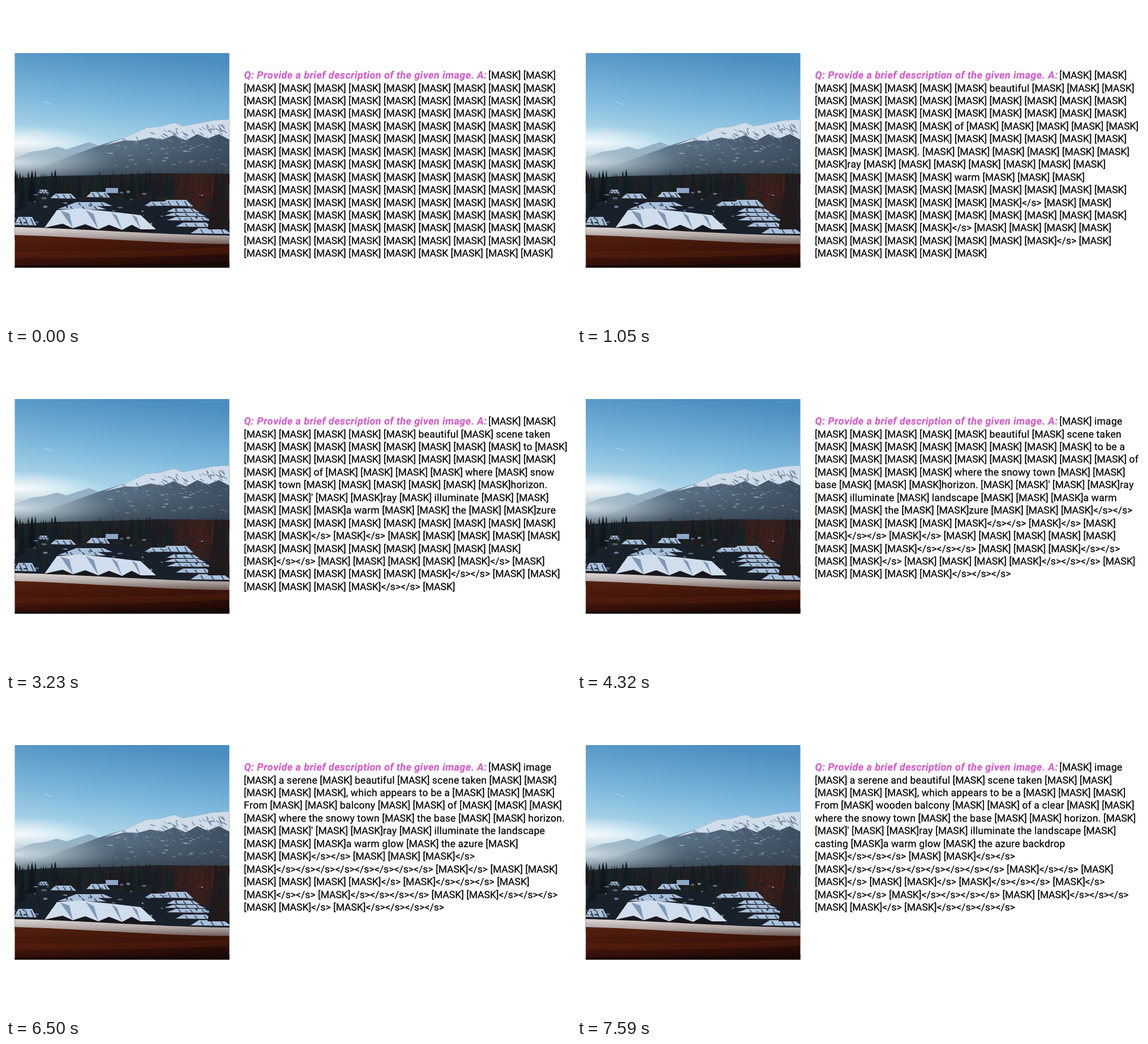
These frames come from a looping animation (998 px wide and 561 px high, 8 s). An HTML page:

```html
<!DOCTYPE html>
<html lang="en">
<head>
<meta charset="utf-8">
<title>Masked text decoding</title>
<style>
  html, body { margin: 0; width: 100%; height: 100%; overflow: hidden; background: #fff; }
  svg { display: block; }
  text { font: 17.5px Roboto, sans-serif; font-kerning: none; white-space: pre; text-rendering: geometricPrecision; }
  #answer { stroke: #000; stroke-width: .25px; }
  .word { letter-spacing: .27px; }
  .end { letter-spacing: .09px; }
  #question { font-size: 18px; font-weight: 700; font-style: italic; letter-spacing: .44px; fill: #d55fcb; stroke: #d55fcb; stroke-width: .2px; }
</style>
</head>
<body>
<svg width="998" height="561" viewBox="0 0 998 561">
  <defs>
    <clipPath id="photo"><rect x="15.5" y="83" width="379" height="378.5"/></clipPath>
    <linearGradient id="sky" x1=".6" y1="0" x2=".4" y2="1">
      <stop offset="0" stop-color="#4a8dc0"/><stop offset=".45" stop-color="#80badd"/>
      <stop offset=".75" stop-color="#b2d9eb"/><stop offset="1" stop-color="#dcecf1"/>
    </linearGradient>
    <radialGradient id="glow">
      <stop offset="0" stop-color="#fff" stop-opacity=".95"/><stop offset="1" stop-color="#fff" stop-opacity="0"/>
    </radialGradient>
    <radialGradient id="haze">
      <stop offset="0" stop-color="#dbe8ee" stop-opacity=".9"/><stop offset="1" stop-color="#a9bfcd" stop-opacity="0"/>
    </radialGradient>
    <linearGradient id="slope" x1="0" y1="0" x2="1" y2="0">
      <stop offset="0" stop-color="#8ca5b7"/><stop offset=".4" stop-color="#5c7285"/><stop offset="1" stop-color="#3d4e60"/>
    </linearGradient>
    <linearGradient id="foot" x1="0" y1="0" x2="0" y2="1">
      <stop offset="0" stop-color="#33424f" stop-opacity="0"/><stop offset="1" stop-color="#2c3843" stop-opacity=".8"/>
    </linearGradient>
    <linearGradient id="woods" x1="0" y1="0" x2="1" y2="0">
      <stop offset="0" stop-color="#1a242c"/><stop offset=".65" stop-color="#1f2024"/>
      <stop offset=".85" stop-color="#35201c"/><stop offset="1" stop-color="#241a1b"/>
    </linearGradient>
    <linearGradient id="rail" x1="0" y1="0" x2="0" y2="1">
      <stop offset="0" stop-color="#dcd8d7"/><stop offset=".5" stop-color="#b3a9a6"/><stop offset="1" stop-color="#6d5b57"/>
    </linearGradient>
    <linearGradient id="wood" x1="0" y1="0" x2=".5" y2="1">
      <stop offset="0" stop-color="#54210f"/><stop offset=".5" stop-color="#43160b"/><stop offset="1" stop-color="#220a07"/>
    </linearGradient>
  </defs>

  <g clip-path="url(#photo)">
    <rect x="15" y="83" width="380" height="220" fill="url(#sky)"/>
    <ellipse cx="20" cy="244" rx="150" ry="34" fill="url(#glow)"/>
    <path d="M68 169L82 174" stroke="#c5e0ee"/>
    <circle cx="53" cy="225" r="6" fill="#e6dfe6" opacity=".5"/>
    <path d="M15 268L45 257L68 254L90 248L107 253L128 246L147 240L165 247L215 240V310H15Z" fill="#94b0c4"/>
    <path d="M15 298L60 284L110 266L165 246L210 232L248 215L272 213L297 206L312 212L335 208L365 202L395 200V315H15Z" fill="url(#slope)"/>
    <path d="M172 246L210 232L248 215L272 213L297 206L312 212L335 208L365 202L395 200V236L376 226L356 234L338 226L318 237L296 228L276 236L255 232L232 238L210 237Z" fill="#cfdce9"/>
    <g id="rocks" stroke="#5f7893" stroke-width="1.6"></g>
    <g id="patches" fill="#c8d4dd"></g>
    <rect x="15" y="255" width="380" height="55" fill="url(#foot)"/>
    <ellipse cx="15" cy="276" rx="185" ry="36" fill="url(#haze)"/>
    <path d="M15 304L80 300L180 298L270 295L395 296V400H15Z" fill="url(#woods)"/>
    <g id="trees"></g>

    <path d="M15 365L45 350L78 345L185 340L250 345L395 375V412H15Z" fill="#18202a"/>
    <g id="roofs"></g>
    <g id="specks"></g>
    <path d="M76 386H262L258 404H72Z" fill="#17171c"/>
    <path d="M68 391L90 360L130 357L196 364L238 369L265 394L238 394L222 386L205 395L182 386L163 394L140 385L118 392L100 384Z" fill="#cfddec"/>
    <path d="M96 361L118 392L112 366ZM141 360L163 394L155 367ZM186 364L205 395L196 370ZM222 368L238 394L231 373Z" fill="#7f98b6"/>
    <path d="M372 292L356 394H392Z" fill="#201a1b"/>

    <path d="M15 402C130 404 270 416 395 419V462H15Z" fill="url(#wood)"/>
    <path d="M15 432C140 434 270 432 395 425V437C270 443 140 446 15 444Z" fill="#6b2a12" opacity=".3"/>
    <path d="M15 458C140 458 270 456 395 452V462H15Z" fill="#160908"/>
    <path d="M15 390C120 392 280 404 395 405V420C270 419 130 407 15 404Z" fill="url(#rail)"/>
  </g>

  <text id="question" x="420.5" y="128.2">Q: Provide a brief description of the given image. A:</text>
  <g id="answer"></g>
</svg>

<script>
const LOOP = 8000, FIRST = 1050, STEP = 1090;
const ROW_Y = 128.2, ROW_H = 22.43;

// "#" is a mask, "#5" five masks in a row, "~" an end token; rows are split by "|".
const states = [
  '#2' + '|#9'.repeat(13) + '|#5 [MASK #3',
  '#2|#5 beautiful #3|#9|#9|#4 of #5|#9|#3. #6|#ray #7|#4 warm #3|#9|#6~ #2|#9|#4~ #4|#7~ #|#5',
  "#2|#5 beautiful #2 taken|#9 to|#9|#3 of #6|#3 town #5|#2. # #' #2ray # illuminate|#5a warm #3|#2zure #6|#5~ #~ #2|#9|#3~ #5|#~ #6|#~~ #6~~|#",
  "#2|#5 beautiful # scene taken|#8 to #|#9|#2 of #4 where # snow|# town #6horizon.|# #' #2ray # illuminate #2|#3a warm #2 the #2zure|#9|#2~ #~ #5|#8|#~~ #5~ #|#6~~ #2|#4~~ #",
  "# image|#5 beautiful # scene taken|#8 to be a|#9 of|#4 where the snowy town #2|base #3horizon. # #' #2ray|# illuminate # landscape #3a warm|#2 the #2zure #3~~|#5~~ #~ #|#~~ #~ #5|#3~~~ #3~~|#2~ #4~~~ #|#4~~~",
  "# image|#2 serene # beautiful # scene taken #|#4, which appears to be a #2|# From #2 balcony #2 of #2|#2 where the snowy town #2 base #|# horizon. # #' #2ray # illuminate|the landscape #3a warm glow # the #|#zure #3~~ #3|#2~~~~~~~~ #~ #|#7~~~|#3~~ #2~~ #2|#~~~ #2~ #~~~~",
  "# image|# a serene # beautiful # scene taken #2|#3, which appears to be a #3|From #2 balcony #2 of #3|# where the snowy town # the base #2 horizon.|# #' #2ray # illuminate the landscape|#3a warm glow # the azure #|#2~~ #3~|#~~~~~~~~ #~ #2|#4~ #~~~ #|#~~ #~~~~ #2~~~|#2~ #~~~~",
  "# image|# a serene and beautiful # scene taken #2|#3, which appears to be a #3|From # wooden balcony #2 of a clear #2|where the snowy town # the base #2 horizon. #|#' #2ray # illuminate the landscape #|casting #a warm glow # the azure backdrop|#~~~ #2~~|#~~~~~~~~ #~~ #|#~ #2~ #~~~ #~|#~~ #~~~~ #2~~~|#2~ #~~~~"
].map(s => s
  .replace(/#(\d)/g, (_, n) => Array(+n).fill('#').join(' '))
  .replace(/#/g, '[MASK]')
  .replace(/~/g, '</s>')
  .split('|'));

const byId = id => document.getElementById(id);

function add(parent, tag, attrs) {
  const el = document.createElementNS('http://www.w3.org/2000/svg', tag);
  for (const k in attrs) el.setAttribute(k, attrs[k]);
  return parent.appendChild(el);
}

let seed = 11;
const rnd = (lo, hi) => {
  seed = (seed * 16807) % 2147483647;
  return lo + (hi - lo) * seed / 2147483647;
};

function tree(x, top, base, w, fill) {
  let d = `M${x} ${top}`;
  for (let i = 1; i <= 4; i++) {
    const y = top + (base - top) * i / 4;
    d += `L${x + w * i / 4} ${y}L${x + w * i / 7} ${y - 1}`;
  }
  for (let i = 4; i >= 1; i--) {
    const y = top + (base - top) * i / 4;
    d += `L${x - w * i / 7} ${y - 1}L${x - w * i / 4} ${y}`;
  }
  add(byId('trees'), 'path', { d: d + 'Z', fill });
}

function roof(x, y, w, h) {
  const g = byId('roofs');
  add(g, 'rect', { x: x + 3, y: y + h - 2, width: w - 4, height: 6, fill: '#1c1f28' });
  add(g, 'path', { d: `M${x} ${y + h - 1}l${w * .2} ${1 - h}h${w * .6}l${w * .2} ${h}z`, fill: '#a9c0da' });
  for (let i = 1; i < 4; i++) {
    add(g, 'path', { d: `M${x + w * i / 4} ${y + h * .2}l5 ${h * .8}`, stroke: '#43546b', 'stroke-width': 2 });
  }
}

function paintScene() {
  for (let i = 0; i < 70; i++) {
    const x = rnd(205, 392);
    const ridge = x < 300 ? 232 - (x - 205) * .25 : 212 - (x - 300) * .1;
    add(byId('rocks'), 'path', { d: `M${x} ${ridge + rnd(2, 26)}l${rnd(3, 9)} ${rnd(2, 8)}`, opacity: rnd(.4, 1) });
  }
  for (let i = 0; i < 60; i++) {
    add(byId('patches'), 'ellipse', {
      cx: rnd(175, 394), cy: rnd(240, 284), rx: rnd(1, 5), ry: rnd(.5, 1.3), opacity: rnd(.2, .6)
    });
  }
  for (let x = 16; x < 396; x += 5) {
    const top = rnd(288, 310);
    const red = x > 300 && x < 370;
    tree(x + rnd(-2, 2), top, top + rnd(30, 48), rnd(4, 7),
      red ? `rgb(${rnd(42, 68)},${rnd(26, 34)},26)` : `rgb(${rnd(16, 34)},${rnd(24, 36)},${rnd(28, 38)})`);
  }
  tree(46, 289, 346, 10, '#0d161d');
  tree(87, 288, 325, 8, '#111c24');
  tree(28, 300, 362, 11, '#101920');
  add(byId('roofs'), 'rect', { x: 176, y: 321, width: 22, height: 9, fill: '#8ba6c7' });
  [
    [56, 324, 20, 7], [78, 331, 46, 9], [142, 328, 42, 10], [14, 372, 40, 15],
    [108, 346, 80, 7], [92, 352, 85, 7], [245, 345, 56, 8], [272, 342, 58, 11],
    [284, 357, 58, 7], [280, 365, 74, 6], [284, 372, 82, 7], [300, 382, 66, 8], [326, 392, 72, 10]
  ].forEach(r => roof(...r));
  for (let i = 0; i < 130; i++) {
    add(byId('specks'), 'ellipse', {
      cx: rnd(16, 394), cy: rnd(326, 388), rx: rnd(1, 5), ry: rnd(.6, 2.4),
      fill: i % 4 ? '#161d26' : '#8fa5bf', opacity: rnd(.4, .9)
    });
  }
  tree(53, 345, 390, 10, '#141d25');
}

const rows = states[0].map((_, i) =>
  add(byId('answer'), 'text', { x: i ? 420 : 852, y: ROW_Y + i * ROW_H }));

const partClass = part => ({ '[': 'mask', '<': 'end', ' ': 'gap' })[part[0]] || 'word';

function writeRow(el, line) {
  el.textContent = '';
  for (const part of line.split(/(\[MASK\]?|<\/s>| )/)) {
    if (part) add(el, 'tspan', { class: partClass(part) }).textContent = part;
  }
}

let shown = -1;
function render(ms) {
  const t = ms % LOOP;
  const i = t < FIRST ? 0 : 1 + Math.floor((t - FIRST) / STEP);
  if (i !== shown) {
    shown = i;
    rows.forEach((el, r) => writeRow(el, states[i][r] || ''));
  }
}

function tick() {
  render(performance.now());
  requestAnimationFrame(tick);
}

paintScene();
tick();
</script>
</body>
</html>
```
